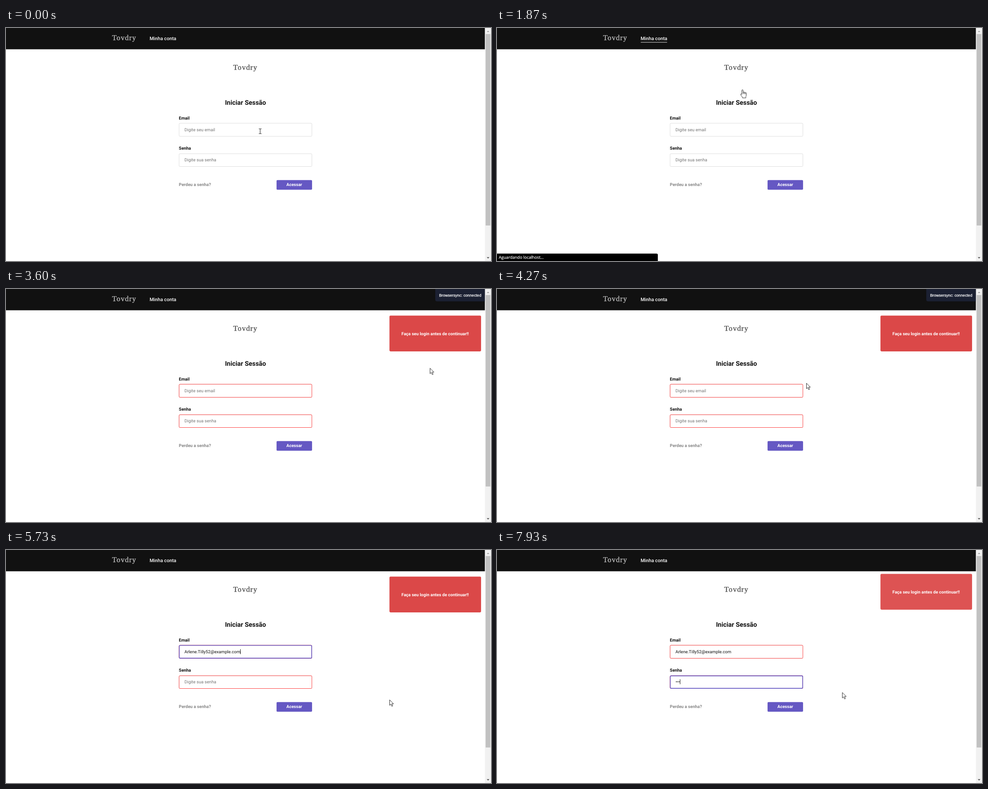
Recreate the animation shown at these times as an HTML page. Size 1079 px wide and 519 px high, loop 8 s.

```html
<!DOCTYPE html>
<html lang="pt-BR">
<head>
<meta charset="utf-8">
<title>Iniciar Sessão</title>
<style>
html, body { margin: 0; width: 100%; height: 100%; overflow: hidden; background: #fff; }
svg { display: block; width: 1079px; height: 519px; }
text { font: 400 9.6px Roboto, sans-serif; fill: #111; text-rendering: geometricPrecision; white-space: pre; }
.b { font-weight: 700; }
.w { fill: #fff; }
.mid { text-anchor: middle; }
.logo { font: 400 16.5px "Liberation Serif", serif; letter-spacing: 1.1px; stroke-width: .3px; }
.nav { font-size: 10.67px; font-weight: 500; fill: #fff; }
.title { font-size: 14.4px; font-weight: 700; }
.hint { fill: #757575; }
.status { font: 400 9.1px "Open Sans", sans-serif; fill: #fff; stroke: #fff; stroke-width: .2px; }
.sync { font: 400 8.64px "Liberation Sans", sans-serif; fill: #fff; stroke: #fff; stroke-width: .25px; }
.box { fill: #fff; stroke: #d6d6d6; stroke-width: .8; }
.red { fill: none; stroke: #ff3131; stroke-width: .9; }
.focus { fill: #fff; stroke: #6558c3; stroke-width: 1.6; }

/* one 8 s clock: 1% = 80 ms */
.t { animation: 8s step-end infinite; }
.smooth { animation: 8s linear infinite; }

#navThin { animation-name: navThin; }
#navBold { animation-name: navBold; }
#underline { animation-name: underline; }
#bar { animation-name: bar; }
#url { animation-name: url; }
#wait { animation-name: wait; }
#sync { animation-name: sync; }
#errors { animation-name: errors; }
#alert { animation-name: alert; }
#mailFocus { animation-name: mailFocus; }
#mailHint { animation-name: mailHint; }
#mail { animation-name: mail; }
#mailStart { animation-name: popup; }
#mailEnd { animation-name: mailEnd; }
#popup { animation-name: popup; }
#passFocus { animation-name: passFocus; }
#passHint { animation-name: passHint; }
#dot1 { animation-name: dot1; }
#dot2 { animation-name: dot2; }
#dot3 { animation-name: dot3; }
#passCaret { animation-name: passCaret; }
#cursor { animation: cursor 8s ease-in-out infinite; }
#arrow { animation-name: arrow; }
#hand { animation-name: hand; }
#beam { animation-name: beam; }

@keyframes navThin { 0% { opacity: 1 } 40.8%, 100% { opacity: 0 } }
@keyframes navBold { 0% { opacity: 0 } 40.8%, 100% { opacity: 1 } }
@keyframes underline { 0%, 11.6% { opacity: 0 } 13.6%, 33.3% { opacity: 1 } 33.31%, 100% { opacity: 0 } }
@keyframes bar { 0%, 15.8% { opacity: 0 } 17.4%, 43.3% { opacity: 1 } 43.31%, 100% { opacity: 0 } }
@keyframes url { 0% { opacity: 1 } 20.8%, 100% { opacity: 0 } }
@keyframes wait { 0% { opacity: 0 } 20.8%, 100% { opacity: 1 } }
@keyframes sync { 0% { opacity: 0 } 40.8% { opacity: 1 } 65.8%, 100% { opacity: 0 } }
@keyframes errors { 0% { opacity: 0 } 33.3%, 100% { opacity: 1 } }
@keyframes alert {
  0%, 33.3% { opacity: 0; transform: translateY(-28px); animation-timing-function: ease-out }
  38.2%, 97.9% { opacity: 1; transform: none }
  100% { opacity: .9; transform: translateY(-10.3px) }
}
@keyframes mailFocus { 0% { opacity: 0 } 60.8% { opacity: 1 } 75%, 100% { opacity: 0 } }
@keyframes mailHint { 0% { opacity: 1 } 65%, 100% { opacity: 0 } }
@keyframes mail { 0% { opacity: 0 } 65%, 100% { opacity: 1 } }
@keyframes mailEnd { 0% { opacity: 0 } 65% { opacity: 1 } 75%, 100% { opacity: 0 } }
@keyframes popup { 0% { opacity: 0 } 60.8% { opacity: 1 } 65%, 100% { opacity: 0 } }
@keyframes passFocus { 0% { opacity: 0 } 85.8%, 100% { opacity: 1 } }
@keyframes passHint { 0% { opacity: 1 } 92.4%, 100% { opacity: 0 } }
@keyframes dot1 { 0% { opacity: 0 } 92.4%, 100% { opacity: 1 } }
@keyframes dot2 { 0% { opacity: 0 } 97.4%, 100% { opacity: 1 } }
@keyframes dot3 { 0% { opacity: 0 } 99%, 100% { opacity: 1 } }
@keyframes passCaret {
  0% { opacity: 0; transform: none }
  85.8% { opacity: 1; transform: none }
  92.4% { opacity: 1; transform: translateX(3.3px) }
  97.4% { opacity: 1; transform: translateX(6.6px) }
  99%, 100% { opacity: 1; transform: translateX(9.8px) }
}
@keyframes cursor {
  0%, .5% { transform: translate(565.5px, 230px) }
  10.9% { transform: translate(368px, 32px) }
  12%, 20.2% { transform: translate(361.5px, 25.8px); animation-timing-function: linear }
  23.3% { transform: translate(545px, 136.8px); animation-timing-function: ease-out }
  25.9%, 28.3% { transform: translate(566px, 145px) }
  31.6%, 32.5% { transform: translate(575px, 135px) }
  38.3%, 42.6% { transform: translate(972.6px, 171.6px) }
  53.3% { transform: translate(688px, 209px) }
  57.5%, 63.4% { transform: translate(659.5px, 226px) }
  71.6%, 72.6% { transform: translate(853px, 333px) }
  76.6%, 77.6% { transform: translate(857px, 346px) }
  78.8% { transform: translate(845px, 349px) }
  84.1%, 97% { transform: translate(594.5px, 301px) }
  99.1%, 100% { transform: translate(767.8px, 316.6px) }
}
@keyframes beam {
  0% { opacity: 1 } 3% { opacity: 0 }
  54.8% { opacity: 1 } 65.5% { opacity: 0 }
  82.5% { opacity: 1 } 98%, 100% { opacity: 0 }
}
@keyframes hand { 0% { opacity: 0 } 11.6% { opacity: 1 } 33.3%, 100% { opacity: 0 } }
@keyframes arrow {
  0% { opacity: 0 } 3% { opacity: 1 } 11.6% { opacity: 0 }
  33.3% { opacity: 1 } 54.8% { opacity: 0 }
  65.5% { opacity: 1 } 82.5% { opacity: 0 } 98%, 100% { opacity: 1 }
}
</style>
</head>
<body>
<svg viewBox="0 0 1079 519" xmlns="http://www.w3.org/2000/svg">
  <!-- header -->
  <rect width="1065.6" height="47.4" fill="#111"/>
  <text class="logo" x="236" y="27" style="fill:#c4c4c4;stroke:#c4c4c4">Tovdry</text>
  <text class="nav t" id="navThin" x="319.5" y="27.1">Minha conta</text>
  <text class="nav b t" id="navBold" x="319.5" y="27.1">Minha conta</text>
  <rect class="smooth" id="underline" x="319.8" y="31.4" width="58.6" height=".9" fill="#fff"/>
  <g class="t" id="sync">
    <path d="M955 0H1065.6V27.5H959a4 4 0 0 1-4-4z" fill="#1b2032"/>
    <text class="sync" x="963.5" y="17">Browsersync: connected</text>
  </g>

  <!-- login form -->
  <text class="logo" x="505.5" y="92.7" style="fill:#4a4a4a;stroke:#4a4a4a">Tovdry</text>
  <text class="title mid" x="532.8" y="170.8">Iniciar Sessão</text>
  <text class="b" x="384.5" y="203.8">Email</text>
  <text class="b" x="384.5" y="270.8">Senha</text>
  <rect class="box" x="385.1" y="212.1" width="295.4" height="29.2" rx="2"/>
  <rect class="box" x="385.1" y="280" width="295.4" height="28.5" rx="2"/>
  <g class="t" id="errors">
    <rect class="red" x="385.1" y="212.1" width="295.4" height="29.2" rx="2"/>
    <rect class="red" x="385.1" y="280" width="295.4" height="28.5" rx="2"/>
  </g>
  <rect class="focus t" id="mailFocus" x="385.5" y="212.5" width="294.6" height="28.4" rx="2"/>
  <rect class="focus t" id="passFocus" x="385.5" y="280.4" width="294.6" height="27.7" rx="2"/>

  <text class="hint t" id="mailHint" x="397" y="230">Digite seu email</text>
  <text class="t" id="mail" x="397" y="230">Arlene.Tilly52@example.com</text>
  <rect class="t" id="mailStart" x="397" y="221" width=".9" height="11"/>
  <rect class="t" id="mailEnd" x="521" y="221" width=".9" height="11"/>

  <text class="hint t" id="passHint" x="397" y="297">Digite sua senha</text>
  <g fill="#111">
    <circle class="t" id="dot1" cx="399" cy="293.5" r="1.1"/>
    <circle class="t" id="dot2" cx="402.2" cy="293.5" r="1.1"/>
    <circle class="t" id="dot3" cx="405.4" cy="293.5" r="1.1"/>
  </g>
  <rect class="t" id="passCaret" x="397" y="288" width=".9" height="11"/>

  <text class="b" x="384.5" y="352.3" style="fill:#888">Perdeu a senha?</text>
  <rect x="601.9" y="338.8" width="79" height="21.4" rx="2" fill="#6558c3"/>
  <text class="b w mid" x="641.3" y="352.2">Acessar</text>
  <rect class="t" id="popup" x="384.5" y="242.5" width="297" height="185" fill="#fff" stroke="#ccc"/>

  <g class="smooth" id="alert">
    <rect x="853.1" y="59.2" width="203.8" height="79.8" rx="2.4" fill="#db4848"/>
    <text class="b w mid" x="954.8" y="102.5">Faça seu login antes de continuar!!</text>
  </g>

  <!-- browser chrome -->
  <g class="smooth" id="bar">
    <path d="M0 502.4H354.8a3 3 0 0 1 3 3V519H0z"/>
    <text class="status t" id="url" x="4" y="514">localhost:3000</text>
    <text class="status t" id="wait" x="4" y="514">Aguardando localhost...</text>
  </g>
  <rect x="1065.6" width="13.4" height="519" fill="#f1f1f1"/>
  <rect x="1067.1" y="13.4" width="10.4" height="426.5" fill="#c1c1c1"/>
  <path d="M1069.5 9h6l-3-3z" fill="#a3a3a3"/>
  <path d="M1069.5 510.5h6l-3 3z" fill="#505050"/>

  <!-- pointer, origin at its hot spot -->
  <g id="cursor">
    <path class="t" id="beam" d="M-3-5.5H-1L0-4.8 1-5.5H3M0-4.8V4.8M-3 5.5H-1L0 4.8 1 5.5H3" fill="none" stroke="#333" stroke-width="1.2"/>
    <path class="t" id="arrow" d="M.5.8V13l2.8-2.6 2.1 4.8 2-.9-2-4.6H9.2z" fill="#fff" stroke="#111" stroke-width=".9"/>
    <g class="t" id="hand" fill="#fff" stroke="#111" stroke-width=".9" stroke-linejoin="round">
      <path d="M-1.5 10.8V1.9a1.4 1.4 0 0 1 2.9 0V6.5a1.2 1.2 0 0 1 2.4.3 1.2 1.2 0 0 1 2.4.5 1.1 1.1 0 0 1 2.2.7V12c0 2-1 3-1 4.5V18.5H0V17L-4 11.6c-1-1.5.7-2.8 1.8-1.6z"/>
      <path d="M1.4 6.5V9.5M3.8 7V9.7M6.2 7.5V10" fill="none"/>
    </g>
  </g>
</svg>
</body>
</html>
```
